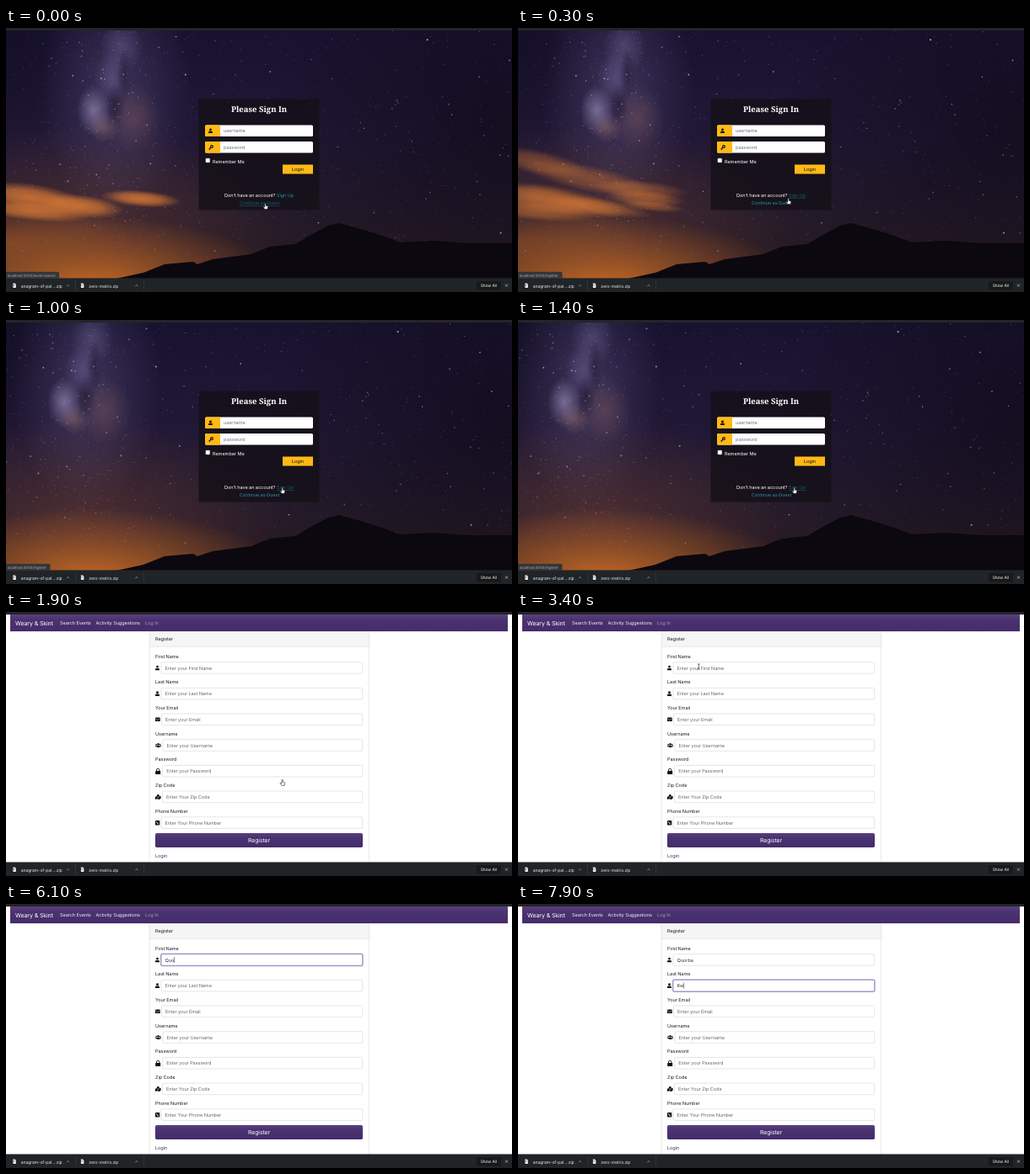
These frames come from a looping animation (600x314 px, 8000 ms). An HTML page with a canvas:

```html
<!DOCTYPE html>
<html lang="en">
<head>
<meta charset="utf-8">
<title>Sign in and register</title>
<style>
  html, body { margin: 0; width: 100%; height: 100%; overflow: hidden; background: #fff; }
  canvas, svg { position: absolute; left: 0; top: 0; width: 600px; height: 314px; }
  text { font-family: Inter, Roboto, sans-serif; letter-spacing: -.015em; text-rendering: geometricPrecision; white-space: pre; }
  .serif { font-family: "Noto Serif", serif; font-weight: 600; letter-spacing: 0; }
</style>
</head>
<body>
<canvas id="sky" width="600" height="314"></canvas>
<svg id="stage" viewBox="0 0 600 314">
  <defs>
    <linearGradient id="purple" x2="0" y2="1">
      <stop stop-color="#5a4180"/><stop offset=".3" stop-color="#4b3271"/><stop offset="1" stop-color="#452c69"/>
    </linearGradient>
    <g id="user"><circle cx="2.5" cy="1.5" r="1.45"/><path d="M0 5.6V4.7Q0 3.3 1.4 3.3H3.6Q5 3.3 5 4.7V5.6Z"/></g>
    <g id="envelope"><rect y=".6" width="5.8" height="4.5" rx=".6"/><path d="M.2 1.6 2.9 3.6 5.6 1.6" fill="none" stroke="#fff" stroke-width=".5"/></g>
    <g id="users"><circle cx="3.5" cy="1.5" r="1.2"/><circle cx="1.2" cy="1.8" r=".8"/><circle cx="5.8" cy="1.8" r=".8"/><path d="M1.6 5.2V4Q1.6 3 2.6 3H4.4Q5.4 3 5.4 4V5.2ZM0 4.2V3.6Q0 2.9.8 2.9H1.7L1.2 4.2ZM7 4.2V3.6Q7 2.9 6.2 2.9H5.3L5.8 4.2Z"/></g>
    <g id="lock"><rect y="2.5" x=".2" width="6" height="4.2" rx=".6"/><path d="M1.5 2.8V1.6a1.7 1.7 0 0 1 3.4 0V2.8" fill="none" stroke="#111" stroke-width=".9"/></g>
    <g id="map"><path d="M0 2.6 1.6 2 3.3 4.4 5 2 6.6 1.6V5L4.5 5.8 2.2 5.1 0 5.8Z"/><path d="M3.3 3.7Q1.8 1.9 1.8 1.3a1.5 1.3 0 0 1 3 0Q4.8 1.9 3.3 3.7Z"/></g>
    <g id="phone"><rect y=".3" width="5.3" height="5.3" rx=".7"/><path d="M1.4 1.6Q1.8 3.9 4 4.3" fill="none" stroke="#fff" stroke-width=".9"/></g>
    <g id="key"><circle cx="4" cy="2" r="1.4" fill="none" stroke="#111" stroke-width="1.1"/><path d="M3 3 .6 5.4M1.2 4.8l.9.9" stroke="#111" stroke-width="1.1"/></g>
    <g id="file"><path d="M-1.6-2.7H.5L1.8-1.4V2.7H-1.6Z" fill="#f1f3f4"/><path d="M-.4-2V.8" stroke="#5f6368" stroke-width=".7"/></g>
  </defs>
  <g id="login"></g>
  <g id="register"></g>
  <g id="chrome"></g>
  <g id="status"></g>
  <g id="pointer">
    <path id="hand" d="M-.6 0Q0-.6.6 0V2.4L2.6 2.9Q3.2 3.1 3.1 3.9L2.5 6.7H-.8L-2.4 4Q-2.3 3.2-1.5 3.6L-.6 4.4Z" fill="#fff" stroke="#222" stroke-width=".6"/>
    <path id="arrow" d="M0 0V6.6L1.5 5.2 2.5 7.5 3.5 7 2.5 4.9H4.6Z" fill="#111" stroke="#fff" stroke-width=".5"/>
    <path id="beam" d="M-1.4-3.3Q0-3.3 0-2.4V2.4Q0 3.3-1.4 3.3M1.4-3.3Q0-3.3 0-2.4M0 2.4Q0 3.3 1.4 3.3" fill="none" stroke="#333" stroke-width=".7"/>
  </g>
</svg>
<script>
const LOOP = 8000, STEP = 100, PAGE_CHANGE = 1500;
const $ = id => document.getElementById(id);
const clamp = v => Math.max(0, Math.min(1, v));
const ramp = (t, from, to) => clamp((t - from) / (to - from));
const smooth = k => k * k * (3 - 2 * k);
const show = (id, on) => $(id).style.display = on ? '' : 'none';

// Markup helpers
const text = (x, y, str, fill = '#222', size = 5.6, extra = '') =>
  `<text x="${x}" y="${y}" fill="${fill}" font-size="${size}" ${extra}>${str}</text>`;
const rect = (x, y, w, h, fill, extra = '') =>
  `<rect x="${x}" y="${y}" width="${w}" height="${h}" fill="${fill}" ${extra}/>`;
const icon = (name, x, y, fill = '#111') => `<use href="#${name}" x="${x}" y="${y}" fill="${fill}"/>`;
const centered = 'text-anchor="middle"';

// Sign-in page
const signInRow = (y, name, hint) =>
  rect(236, y, 128, 13.5, '#fff', 'rx="1.6"') +
  `<path d="M254 ${y}H237.6q-1.6 0-1.6 1.6v10.3q0 1.6 1.6 1.6H254z" fill="#ffb916"/>` +
  icon(name, 240, y + 4) + text(258, y + 8.9, hint, '#6c757d');

$('login').innerHTML =
  rect(228.5, 84.5, 143, 132, '#141017', 'fill-opacity=".8"') +
  text(300, 99.6, 'Please Sign In', '#fff', 9.5, `class="serif" ${centered}`) +
  signInRow(115.5, 'user', 'username') + signInRow(135, 'key', 'password') +
  rect(236.8, 155, 5, 5, '#fff', 'rx=".8" stroke="#888" stroke-width=".4"') +
  text(245, 160.6, 'Remember Me', '#fff') +
  rect(328, 162.5, 36, 11, '#ffb916') + text(346, 170, 'Login', '#111', 5.6, centered) +
  text(259, 201.3, "Don't have an account?", '#fff') +
  text(321, 201.3, 'Sign Up', '', 5.6, 'id="signUp"') +
  text(277, 210, 'Continue as Guest', '', 5.6, 'id="guest"');

// Register page
const ROW = 30.7;
const fields = [
  ['First Name', 'Enter your First Name', 'user', 184],
  ['Last Name', 'Enter your Last Name', 'user', 184],
  ['Your Email', 'Enter your Email', 'envelope', 184.5],
  ['Username', 'Enter your Username', 'users', 186],
  ['Password', 'Enter your Password', 'lock', 185.7],
  ['Zip Code', 'Enter Your Zip Code', 'map', 185.5],
  ['Phone Number', 'Enter Your Phone Number', 'phone', 184],
];

$('register').innerHTML =
  rect(0, 0, 600, 314, '#fff') +
  rect(5, 3, 590, 20, 'url(#purple)') +
  text(11, 15.8, 'Weary &amp; Skint', '#fff', 7) +
  text(64, 15.3, 'Search Events', '#f1edf6') + text(106.5, 15.3, 'Activity Suggestions', '#f1edf6') +
  text(165, 15.3, 'Log In', '#a294b6') +
  rect(170, 23, 260.5, 18, '#f5f5f5') +
  `<path d="M170 23V298M430.5 23V298M170 41.3H430.5" stroke="#dcdcdc" stroke-width=".6"/>` +
  text(177, 34.4, 'Register') +
  fields.map(([label, hint, glyph, x], i) => {
    const y = 59.6 + i * ROW;
    return text(177, y - 5, label) + icon(glyph, 177, y + 4) +
      rect(x - .3, y - .3, 423.3 - x, 14.2, 'none', `id="ring${i}" rx="1.8" stroke="#6f5bc0" stroke-width="1.5" stroke-opacity="0"`) +
      rect(x, y, 422.7 - x, 13.6, '#fff', `id="box${i}" rx="1.5" stroke="#ced4da" stroke-width=".6"`) +
      text(x + 4.6, y + 8.9, hint, '#666d74', 5.6, `id="value${i}"`);
  }).join('') +
  rect(177, 263, 246, 17, 'url(#purple)', 'rx="1.8"') +
  text(300, 274, 'Register', '#fff', 6.9, centered) +
  text(177, 292.2, 'Login', '#452c69') +
  `<path id="caret" stroke="#111" stroke-width=".5"/>`;

// Browser frame
const download = (x, name, chevron) =>
  icon('file', x, 306.3) + text(x + 7.8, 308.9, name, '#e8eaed', 5.05) +
  `<path d="M${chevron - 1.6} 307l1.6-1.5 1.6 1.5" fill="none" stroke="#bdc1c6" stroke-width=".6"/>`;

$('chrome').innerHTML =
  rect(0, 0, 600, 3, '#242529') + rect(0, 297.5, 600, 16.5, '#212427') +
  '<path d="M82.5 300V312M163.5 300V312" stroke="#3c4043" stroke-width=".6"/>' +
  download(10, 'anagram-of-pal....zip', 73.7) + download(90.5, 'zero-matrix.zip', 155) +
  rect(558, 301, 28.5, 10.5, '#17191b', 'rx="1.5"') + text(572.3, 308.2, 'Show All', '#fff', 4.8, centered) +
  '<path d="M592 304.7l3 3m0-3l-3 3" stroke="#dadce0" stroke-width=".6"/>';

// Night sky
let seed = 7;
const random = () => (seed = (seed * 16807) % 2147483647) / 2147483647;
const spread = () => random() + random() + random() - 1.5;
const stars = Array.from({ length: 2300 }, (_, i) => {
  const y = random() * 275, inBand = i > 1500;
  return {
    x: inBand ? 135 - y * .1 + spread() * 80 : random() * 680,
    y, size: .6 + random() ** 8 * 1.2, alpha: .1 + random() ** 3 * .75,
  };
});
const ctx = $('sky').getContext('2d');

// Soft ellipse; core is the opacity kept halfway out
function glow(x, y, rx, ry, rgb, alpha, core = .5, tilt = 0) {
  const g = ctx.createRadialGradient(0, 0, 0, 0, 0, 1);
  g.addColorStop(0, `rgba(${rgb},${alpha})`);
  g.addColorStop(.5, `rgba(${rgb},${alpha * core})`);
  g.addColorStop(1, `rgba(${rgb},0)`);
  ctx.save();
  ctx.translate(x, y);
  ctx.rotate(tilt);
  ctx.scale(rx, ry);
  ctx.fillStyle = g;
  ctx.fillRect(-1, -1, 2, 2);
  ctx.restore();
}

// Cloud banks: x, y, half width, half height, tilt
const lowBank = [[30, 202, 68, 17, .15], [88, 212, 52, 14, .1], [30, 218, 70, 11, .1], [160, 203, 48, 10, .08]];
const highBank = [[15, 160, 62, 15, .2], [75, 179, 80, 16, .2], [135, 192, 58, 11, .08], [35, 204, 62, 17, .15],
  [95, 214, 55, 10, .15], [150, 212, 40, 6, .1]];
const drawBank = (bank, shift, alpha) => bank.forEach(([x, y, rx, ry, tilt]) =>
  glow(x + shift, y, rx, ry, '218,122,54', alpha * .85, .75, tilt));

function drawSky(t) {
  const base = ctx.createLinearGradient(0, 0, 0, 298);
  [[0, '#18122f'], [.45, '#211835'], [.75, '#241a2a'], [1, '#2a1a1d']].forEach(s => base.addColorStop(...s));
  ctx.fillStyle = base;
  ctx.fillRect(0, 0, 600, 314);
  glow(600, 130, 300, 240, '11,7,18', .6);
  glow(0, 20, 90, 140, '14,10,26', .4);
  glow(90, 235, 240, 120, '115,66,55', .5);

  const drift = -t * .035;
  const milky = '135,122,180', dust = '25,16,36';
  glow(130 + drift, 75, 90, 150, milky, .3);
  glow(137 + drift, 22, 26, 34, milky, .35);
  glow(126 + drift, 58, 22, 30, milky, .35);
  glow(104 + drift, 98, 20, 30, '175,160,205', .55);
  glow(116 + drift, 118, 18, 18, '190,135,120', .35);
  glow(152 + drift, 108, 32, 40, '140,95,95', .4);
  glow(140 + drift, 55, 9, 34, dust, .5);
  glow(130 + drift, 92, 12, 26, dust, .5);

  for (const s of stars) {
    ctx.fillStyle = `rgba(190,185,240,${s.alpha})`;
    ctx.fillRect(s.x + drift, s.y, s.size, s.size);
  }

  glow(100, 304, 230, 80, '222,118,38', .8);
  const early = 1 - smooth(ramp(t, 100, 600));
  const late = smooth(ramp(t, 100, 500)) * (1 - smooth(ramp(t, 600, 1000)));
  drawBank(lowBank, -t * .03, early);
  drawBank(highBank, (600 - t) * .03, late);
  glow(0, 255, 150, 50, '150,82,36', .6 * Math.max(early, late));

  ctx.fillStyle = '#0b080f';
  ctx.beginPath();
  ctx.moveTo(122, 300);
  [[163, 291], [188, 281], [222, 278], [227, 281], [245, 275], [291, 269], [313, 260], [343, 257], [358, 248],
   [382, 235], [395, 232], [424, 240], [449, 248], [467, 255], [506, 253], [550, 256], [600, 256], [600, 300]]
    .forEach(p => ctx.lineTo(...p));
  ctx.fill();
}

// Pointer: time, x, y
const path = [[0, 307.5, 208.8], [500, 327.6, 199.6], [2300, 327.6, 199.6], [3200, 216, 60], [3400, 214.4, 65],
  [4000, 214.4, 65], [4400, 399.5, 60.5], [4500, 399.5, 60.5], [4900, 392.5, 49.5], [LOOP, 392.5, 49.5]];

function movePointer(t) {
  const i = path.findIndex(p => p[0] > t);
  const [t0, x0, y0] = path[i - 1], [t1, x1, y1] = path[i];
  const k = smooth(ramp(t, t0, t1));
  const x = x0 + (x1 - x0) * k, y = y0 + (y1 - y0) * k;
  const overField = x > 184 && x < 423 && y > 59 && (y - 59) % ROW < 14.5;
  const kind = t < 2400 ? 'hand' : overField ? 'beam' : 'arrow';
  for (const id of ['hand', 'arrow', 'beam']) show(id, id === kind);
  $('pointer').setAttribute('transform', `translate(${x} ${y})`);
  show('pointer', t < 5500);
}

// Typed fields: focus and blur times, and when each letter lands
const entries = [
  { focus: 3600, blur: 6900, word: 'Quorba', keys: [5500, 5700, 6100, 6200, 6400, 6600] },
  { focus: 6900, blur: LOOP + 500, word: 'Kw', keys: [7600, 7800] },
];

function drawEntry({ focus, blur, word, keys }, i, t) {
  const struck = keys.filter(k => k <= t);
  const value = $('value' + i);
  value.textContent = word.slice(0, struck.length) || fields[i][1];
  value.setAttribute('fill', struck.length ? '#343a40' : '#666d74');

  const lit = ramp(t, focus - 80, focus + 100) * (1 - ramp(t, blur - 80, blur + 100));
  $('ring' + i).setAttribute('stroke-opacity', lit * .45);
  $('box' + i).setAttribute('stroke', lit > .3 ? '#6a559f' : '#ced4da');

  if (t < focus || t >= blur) return;
  const since = t - (struck.at(-1) ?? focus);
  const x = 188.8 + (struck.length ? value.getComputedTextLength() : 0);
  $('caret').setAttribute('d', `M${x} ${63 + i * ROW}v7`);
  show('caret', since % 1000 < 500);
}

function styleLink(id, hovered) {
  $(id).setAttribute('fill', hovered ? '#12606c' : '#23939f');
  $(id).setAttribute('text-decoration', hovered ? 'underline' : 'none');
}

let statusUrl;
function drawStatus(t) {
  const url = t < 300 ? 'localhost:5000/event-search' : 'localhost:5000/register';
  if (url !== statusUrl) {
    statusUrl = url;
    $('status').innerHTML = rect(-2, 290, t < 300 ? 65 : 54.5, 8, '#35363a', 'rx="1.5"') +
      text(1.8, 295.6, url, '#a5a9ae', 4.3);
  }
  $('status').setAttribute('opacity', 1 - ramp(t, 1600, 1900));
}

function frame() {
  const t = Math.floor(performance.now() % LOOP / STEP) * STEP;
  const signingIn = t < PAGE_CHANGE;
  show('login', signingIn);
  show('register', !signingIn);
  show('caret', false);
  if (signingIn) {
    drawSky(t);
    styleLink('guest', t < 300);
    styleLink('signUp', t >= 300);
  } else {
    entries.forEach((entry, i) => drawEntry(entry, i, t));
  }
  drawStatus(t);
  movePointer(t);
  requestAnimationFrame(frame);
}
frame();
</script>
</body>
</html>
```
